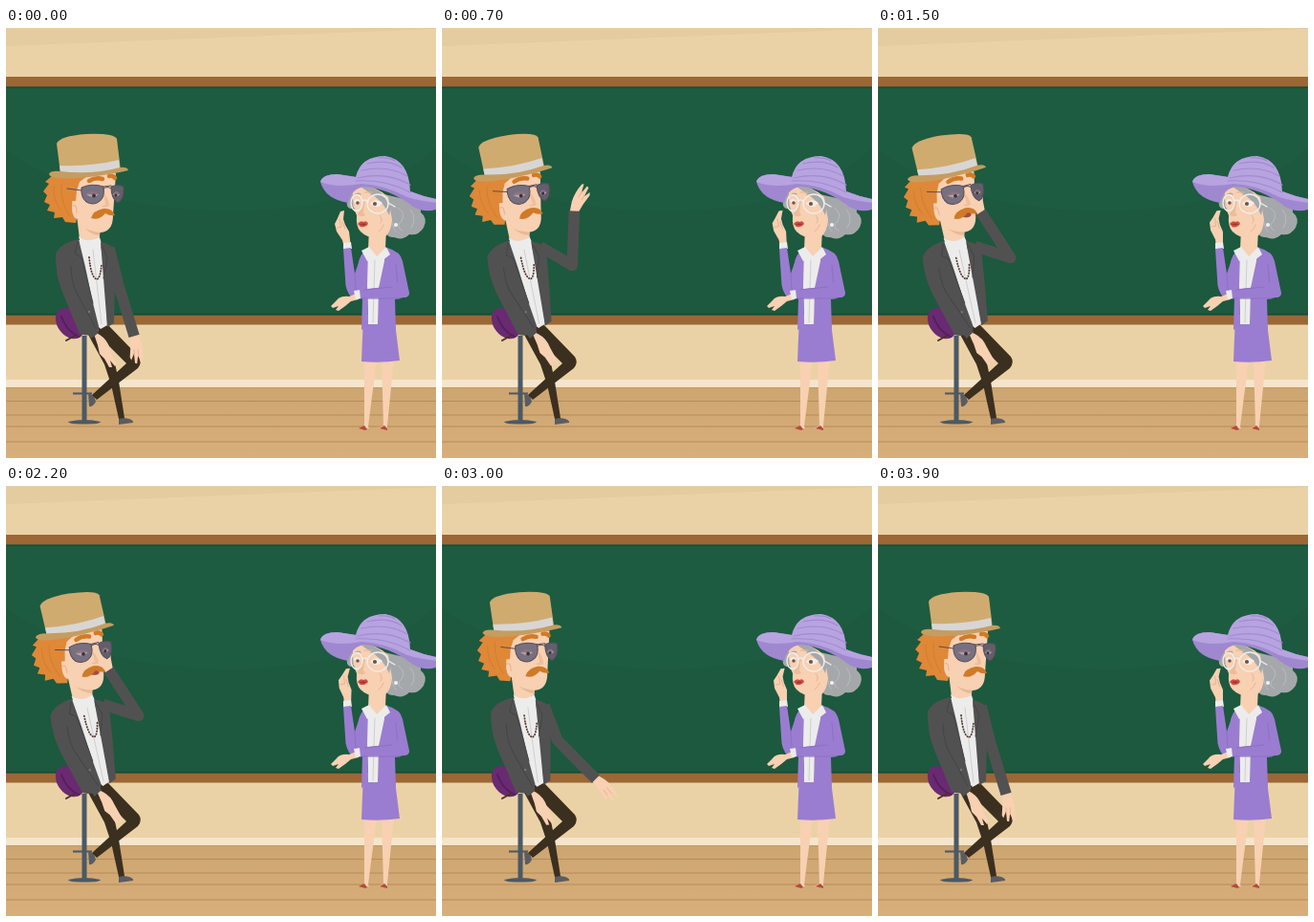
An HTML page for the animation above (4000 ms loop, 450 by 450 pixels).

```html
<!DOCTYPE html>
<html lang="en">
<head>
<meta charset="utf-8">
<title>Classroom talk</title>
<style>
html, body { margin: 0; width: 100%; height: 100%; overflow: hidden; background: #ebd2a6; }
svg { display: block; width: 100vw; height: 100vh; }
.skin { fill: #f8d0b2; }
.coat { fill: #525152; }
.lilac { fill: #9a7dd0; }
.white { fill: #ececec; }
.line { fill: none; stroke-linecap: round; stroke-linejoin: round; }
</style>
</head>
<body>
<svg viewBox="0 0 450 450">
  <defs>
    <linearGradient id="floor" x2="0" y2="1">
      <stop stop-color="#cda570"/><stop offset="1" stop-color="#d8af7a"/>
    </linearGradient>
  </defs>

  <!-- room -->
  <path fill="#ebd2a6" d="M0 0H450V376H0Z"/>
  <path fill="#e4cba0" d="M0 0H450V1L0 19Z"/>
  <path fill="#9b6735" d="M0 51H450V310.5H0Z"/>
  <path fill="#1d5c40" d="M0 61.5H450V300.5H0Z"/>
  <path fill="#174e38" d="M0 61.5H450V63H0ZM0 298.5H450V300.5H0Z"/>
  <path fill="#1b583d" d="M0 128Q90 192 240 192Q380 190 450 126V298H0Z" opacity=".6"/>
  <path fill="#f5e5cc" d="M0 368H450V376H0Z"/>
  <path fill="url(#floor)" d="M0 376H450V450H0Z"/>
  <path fill="#c39a64" d="M0 376H450V377H0Z"/>
  <path class="line" stroke="#b38a58" stroke-width=".9" d="M0 390.5H450M0 405H450M0 417H450M0 433H450"/>

  <!-- stool -->
  <ellipse cx="67" cy="309" rx="18" ry="13" transform="rotate(52 67 309)" fill="#6a2a72"/>
  <path class="line" stroke="#54205c" stroke-width="2" d="M58 302Q63 317 76 323"/>
  <path class="line" stroke="#4b3324" stroke-width="2" d="M63 327L72 322"/>
  <path fill="#4a5965" d="M79.500 322H84.500V410H79.500ZM65 412Q82 408 99 412Q99 414.500 82 414.500Q65 414.500 65 412ZM70 381.500H90V383.500H70Z"/>

  <!-- his legs -->
  <path fill="#5a5c62" d="M118 407L129 409Q134 411 133 413L118 415ZM86 382L92 385L94 391Q91 397 87 396Z"/>
  <path fill="#3b2f1f" d="M85 319L99 316L113 346L118 370L124 408L118 409L110 373L103 352Z"/>
  <path fill="#3b2f1f" d="M95 312L107 311L139 344Q143 350 138 356L95 389L90 384L126 351L101 326Z"/>

  <!-- his moving arm -->
  <g id="hand" class="skin">
    <path d="M-3-4L8-6Q18-7 29-3L30-1L20 0L29 3L28 5L18 4L24 8L21 9L10 6L-3 4Z"/>
    <path class="line" stroke="#e3ad8b" stroke-width=".8" d="M15-1L22 0M14 3L20 4"/>
  </g>
  <path id="sleeve" class="line" stroke="#525152" stroke-width="11.500" style="stroke-linecap:butt"/>

  <!-- his upper body -->
  <g id="man">
    <path class="white" d="M76 222L98 221L103 250L106 311L99 315L92 308Z"/>
    <path class="skin" d="M74 196H98V219Q88 230 77 221Z"/>
    <path fill="#e7b996" d="M82 209Q90 214 99 212L98 217Q90 217 82 209Z"/>
    <path class="white" d="M76 218Q85 226 98 219L101 229L89 227L80 233Z"/>
    <path class="line" stroke="#cfcfcf" d="M91 232L100 310"/>
    <path class="line" stroke="#57392f" stroke-width="1.800" stroke-dasharray=".5 2.4" d="M87 240Q89 261 95 263Q99 262 100 247"/>
    <path class="coat" d="M76 221Q57 225 52 236Q51 252 58 274L77 320Q86 323 96 320L97 312L91 288L83 250Z"/>
    <path class="coat" d="M99 224Q111 226 114 234L114 270L113 309L106 313L102 262Z"/>
    <path class="line" stroke="#444446" d="M75 224L72 236L79 240L91 288M100 227L106 240L102 262"/>
    <path class="skin" d="M91 317L98 321Q106 326 109 336L116 352L114 354L109 348L111 355L108 355L103 346L98 341L96 332Z"/>
    <path class="coat" d="M54 234Q50 258 60 276L89 325L97 319L72 272L70 240Z"/>
    <path class="line" stroke="#444446" d="M68 249Q68 268 76 281L94 314"/>
    <circle cx="87" cy="297" r="1.200" fill="#777"/>

    <path fill="#df8837" d="M49 154L41 161L45 163L39 171L43 175L40 182L46 185L43 191L51 193L50 199L59 198L62 203L73 204L79 180L78 150Z"/>
    <path class="line" stroke="#d27f31" d="M50 166Q49 180 57 191M58 163Q56 180 66 196"/>
    <path class="skin" d="M70 160Q88 148 115 152L112 196Q112 213 99 214Q83 213 77 200Q70 201 69 190Z"/>
    <path fill="#df8837" d="M63 154Q88 150 117 147L116 151Q96 152 85 155L77 161L74 170L73 181L66 181Z"/>
    <path class="line" stroke="#eab591" stroke-width="1.200" d="M70 186Q74 184 74 193"/>
    <path fill="#efbe9b" d="M102 172Q108 180 108 186Q104 189 100 186L104 185Z"/>
    <path class="line" stroke="#d27a26" stroke-width="4.500" d="M87 160Q94 156 101 158M108 155Q112 154 114 157"/>
    <g stroke="#574c58" stroke-width="1">
      <path fill="#77707f" d="M79 167Q90 162 102 166Q104 178 97 182Q91 186 84 182Q78 177 79 167Z"/>
      <path fill="#625f6d" d="M110 166Q118 163 123 166Q124 180 117 183Q110 179 110 166Z"/>
      <path class="line" d="M64 168L79 170M102 168Q106 165 110 168M102 166L110 165"/>
    </g>
    <g id="gaze">
      <path fill="#b49ea9" d="M84 174Q90 169 97 174Q91 180 84 174ZM112 174Q115 170 119 174Q115 179 112 174Z"/>
      <path fill="#8e7280" d="M83 174Q90 168 98 174L90 174ZM112 174Q115 168 119 174Z"/>
      <circle cx="92" cy="175.500" r="1.900" fill="#3b3038"/><circle cx="115" cy="175" r="1.600" fill="#3b3038"/>
    </g>
    <ellipse id="hisMouth" cx="103" cy="196" rx="4.500" ry="3" fill="#a44a43"/>
    <path fill="#cf7a27" d="M89 199Q91 191 102 189Q111 188 114 196Q109 197 104 194Q97 202 89 199Z"/>

    <path fill="#d0ab6f" d="M53 121Q56 113 84 111Q113 110 116 116L120 149Q88 158 57 152Z"/>
    <path fill="#d8d6d4" d="M56 144Q91 145 118 138L119 147Q90 155 57 152Z"/>
    <path fill="#c59d60" d="M45 153Q46 149 57 150Q90 154 119 146Q127 145 128 149Q111 153 87 156Q47 160 45 153Z"/>
  </g>

  <!-- her legs and skirt -->
  <path class="skin" d="M375 347H388L379 417L380 419H371L375 416ZM393 347H406L399 416V419H390L395 416Z"/>
  <path fill="#b9473f" d="M369 419L375 416L378 420L376 421ZM391 419L396 416L399 419V421Z"/>
  <path class="lilac" d="M374 300H406L412 348Q391 351 372 349Z"/>

  <!-- her body -->
  <path class="white" d="M376 233L398 230L393 272L389 310H379L378 270Z"/>
  <path class="skin" d="M380 210H398L397 231L388 240L379 232Z"/>
  <path class="line" stroke="#cfcfcf" d="M386 243L384 308"/>
  <path class="lilac" d="M399 230Q413 234 415 244L422 277Q422 282 416 282L407 284L408 316L389 313L390 272Z"/>
  <path class="lilac" d="M379 231Q370 235 368 250L364 282L373 283L372 316L379 312L378 270Z"/>
  <path class="white" d="M372 233L380 229L388 239L398 229L402 237L393 244L387 240L378 244Z"/>
  <g id="herHand" class="skin">
    <path d="M354 230L352 222L346 213L344 205L347 199L350 192L354 191L353 200L355 206L359 213L361 230Z"/>
    <path class="line" stroke="#e3ad8b" stroke-width=".8" d="M349 200L351 208L347 209M352 203L355 210"/>
  </g>
  <path class="white" d="M353 225L361 224L362 231L353 232Z"/>
  <path class="lilac" d="M353 231L361 230L365 257L371 240L377 270Q370 284 362 282Q355 276 355 262Z"/>
  <path class="line" stroke="#8d70c3" d="M365 257L366 273M408 248L410 271"/>
  <path class="skin" d="M369 277L359 281Q350 280 346 285L340 291L342 293L348 291L345 295L348 296L355 291L361 286L369 284Z"/>
  <path class="white" d="M364 275L371 274L372 283L366 284Z"/>
  <path class="lilac" d="M370 274L405 270L416 262L422 278Q421 282 416 282L371 283Z"/>
  <path class="line" stroke="#8d70c3" d="M372 283H412M375 274L404 271"/>

  <!-- her head -->
  <g id="head">
    <path fill="#a5a8aa" d="M391 173L426 181Q435 186 434 193Q442 199 437 209Q431 218 422 216Q415 223 406 219Q398 220 397 211L395 190Z"/>
    <path class="line" stroke="#b9bbbd" d="M410 188Q419 193 414 202Q407 208 415 212M423 190Q431 199 424 209M403 197Q404 209 408 213"/>
    <path fill="#a5a8aa" d="M366 168Q355 177 357 186Q360 192 365 187Z"/>
    <path class="skin" d="M363 168Q382 160 400 177L404 201Q403 214 396 219Q380 222 371 213Q366 208 367 196Q362 188 363 168Z"/>
    <path fill="#a5a8aa" d="M371 166Q392 164 403 187L401 196Q395 181 381 173Z"/>
    <path class="line" stroke="#e6b594" d="M392 204Q395 200 391 196M390 213Q394 210 395 206M375 172H383"/>
    <path fill="#edbc99" d="M376 178Q370 190 368 195Q371 199 376 196L374 193Z"/>
    <path fill="#f2eee9" d="M364 181Q367 177 371 181Q368 188 364 181ZM381 184Q387 177 394 183Q388 191 381 184Z"/>
    <circle cx="368" cy="183" r="1.800" fill="#715447"/><circle cx="386" cy="184" r="2.100" fill="#715447"/>
    <path id="lids" fill="#dfaf94" d="M363 182Q367 176 372 181Q368 189 363 182ZM380 184Q387 177 395 183Q388 191 380 184Z"/>
    <path class="line" stroke="#a5a5a4" stroke-width="1.300" d="M365 175Q368 172 371 174M382 175Q388 172 394 176"/>
    <g class="line" stroke="#eeeeec" stroke-width="1.400">
      <ellipse cx="367" cy="183" rx="6" ry="8.500"/><ellipse cx="389" cy="184" rx="11" ry="10"/>
      <path d="M373 181Q375 179 378 181M400 183L407 187"/>
    </g>
    <g id="herMouth">
      <path fill="#d04b43" d="M368 205Q371 201 374 203Q378 201 379 205Q376 209 371 208Z"/>
      <path fill="#9a3230" d="M370 205.500Q374 203.500 377 205.500Q374 207 370 205.500Z"/>
    </g>
    <circle cx="408" cy="206" r="2" fill="#f1f1f1"/>
    <path fill="#9f88cf" d="M329 161Q331 153 347 153L367 156Q398 150 423 171Q438 177 455 180V188Q440 195 426 187Q402 168 374 166Q361 169 358 183Q334 179 329 161Z"/>
    <path fill="#b7a3e0" d="M329 161Q331 153 347 153L366 156Q371 134 397 134Q422 138 423 171Q438 177 455 180V183Q436 182 420 177Q396 164 372 163Q345 168 329 161Z"/>
    <path class="line" stroke="#a18bd0" stroke-width="1.200" d="M378 142Q399 137 414 146M372 149Q399 143 420 155M368 157Q398 150 423 164M366 160Q398 158 423 172M390 136Q400 135 407 139"/>
  </g>
</svg>
<script>
const LOOP = 4000, FRAME = 100;
const PIVOT = { x: 90, y: 290 }, SHOULDER = { x: 108, y: 230 };
const $ = id => document.getElementById(id);
const rad = deg => deg * Math.PI / 180;
const polar = (p, len, deg) => ({ x: p.x + len * Math.cos(rad(deg)), y: p.y + len * Math.sin(rad(deg)) });

// time, lean, upper arm, forearm, hand (degrees)
const rest = [0, 76, 73, 78], raised = [-6, 18, -123, -110];
const poses = [
  [0, ...rest],
  [400, -2.6, 63, 4, 40],
  [900, ...raised],
  [2400, ...raised],
  [2700, -3.8, 51, -27, -50],
  [3200, ...rest],
  [LOOP, ...rest]
];
const easeIn = p => p ** 1.4, easeOut = p => 1 - (1 - p) ** 1.4;

function poseAt(t) {
  const i = poses.findIndex(k => k[0] > t) - 1;
  const a = poses[i], b = poses[i + 1];
  const p = (t - a[0]) / (b[0] - a[0]);
  const e = i % 3 ? easeOut(p) : easeIn(p);
  return a.slice(1).map((v, n) => v + (b[n + 1] - v) * e);
}

function rotate(p, c, deg) {
  const s = Math.sin(rad(deg)), k = Math.cos(rad(deg)), dx = p.x - c.x, dy = p.y - c.y;
  return { x: c.x + dx * k - dy * s, y: c.y + dx * s + dy * k };
}

const scaleY = (y, k) => `translate(0 ${y * (1 - k)}) scale(1 ${k})`;

function drawMan(t) {
  const [lean, upper, fore, hand] = poseAt(t);
  const s = rotate(SHOULDER, PIVOT, lean);
  const elbow = polar(s, 39, upper), wrist = polar(elbow, 57, fore);
  $('man').setAttribute('transform', `rotate(${lean} ${PIVOT.x} ${PIVOT.y})`);
  $('sleeve').setAttribute('d', `M${s.x} ${s.y}L${elbow.x} ${elbow.y}L${wrist.x} ${wrist.y}`);
  $('hand').setAttribute('transform', `translate(${wrist.x} ${wrist.y}) rotate(${hand})`);
  const talk = t >= 1200 && t < 2400 ? Math.abs(Math.sin(t / 600 * Math.PI)) : 0;
  $('hisMouth').setAttribute('transform', scaleY(196, talk));
  $('gaze').setAttribute('transform', `translate(${-lean / 6} 0)`);
}

function drawWoman(t) {
  const swing = 9 * (1 - Math.cos(t / 900 * 2 * Math.PI)) / 2;
  $('herHand').setAttribute('transform', `rotate(${swing} 358 230)`);
  const blink = t >= 900 && t < 1100;
  $('lids').style.display = blink ? '' : 'none';
  $('head').setAttribute('transform', `translate(0 ${blink ? 1 : 0})`);
  const open = t >= 900 && t < 3600 ? 1.15 + .2 * Math.sin(t / 200 * Math.PI + 1) : 1;
  $('herMouth').setAttribute('transform', scaleY(204, open));
}

function tick() {
  const t = Math.floor(performance.now() % LOOP / FRAME) * FRAME;
  drawMan(t);
  drawWoman(t);
  requestAnimationFrame(tick);
}
tick();
</script>
</body>
</html>
```
